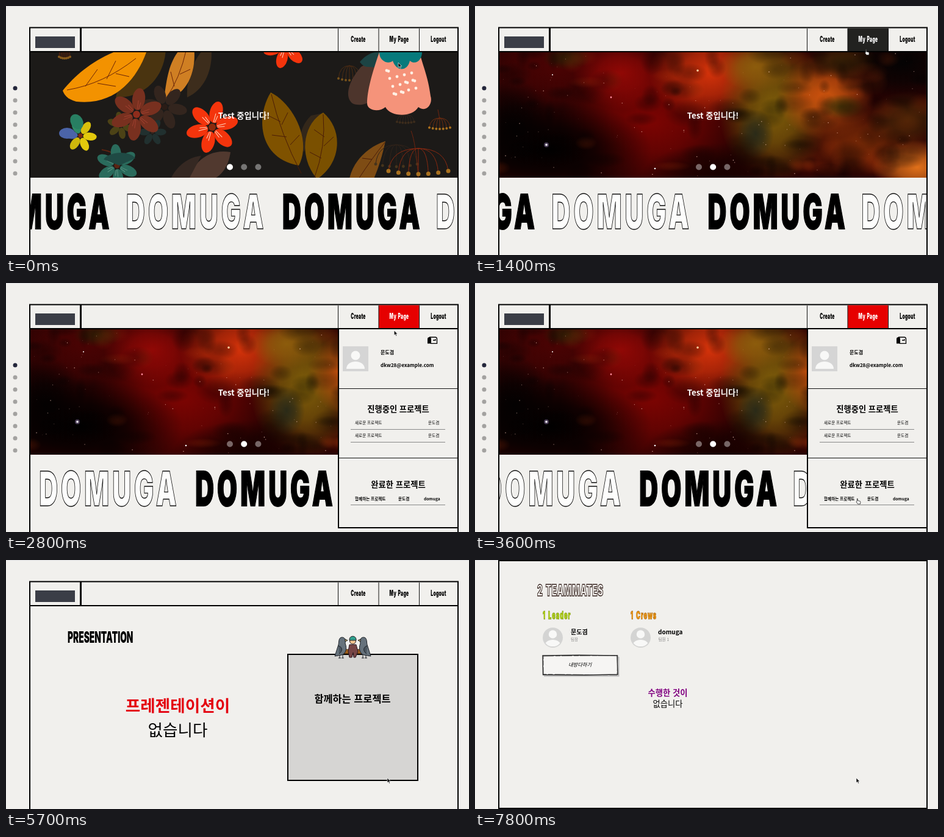
An HTML page for the animation above (8000 ms loop, 759 by 409 pixels).

```html
<!DOCTYPE html>
<html lang="ko">
<head>
<meta charset="utf-8">
<style>
html, body { margin: 0; width: 100%; height: 100%; overflow: hidden; background: #f1f0ed; }
svg { display: block; font-family: "Noto Sans CJK KR", "Noto Sans CJK", sans-serif; }
.d { font-family: Inter, sans-serif; font-weight: 900; letter-spacing: .04em; word-spacing: .15em; }
.m { text-anchor: middle; }
.b { font-weight: 700; }
.s { font-size: 6.6px; }
.h { font-size: 13.3px; font-weight: 700; text-anchor: middle; }
.line { fill: none; stroke: #000; stroke-width: 2; }
.thin { fill: none; stroke: #111; stroke-width: 1; }
.rule { fill: none; stroke: #888; stroke-width: 1; }
</style>
</head>
<body>
<svg width="759" height="409" viewBox="0 0 759 409">
  <defs>
    <clipPath id="inner"><path d="M40 76H740V409H40Z"/></clipPath>
    <clipPath id="stageClip"><path d="M40 76H740V282H40Z"/></clipPath>
    <clipPath id="drop"><rect id="dropRect" x="544" y="76" width="198" height="0"/></clipPath>
    <clipPath id="round"><circle r="16.5"/></clipPath>
    <g id="bust" fill="#f8f8f7">
      <circle cy="-6" r="7.5"/>
      <path d="M-15 16C-15 0 15 0 15 16Z"/>
    </g>
    <g id="face">
      <circle r="16.5" fill="#d4d4d3"/>
      <use href="#bust" clip-path="url(#round)" transform="scale(.9)"/>
    </g>
    <g id="bird" stroke="#1c2026" stroke-width="1">
      <path d="M547 154V161M552 154V161M545 161h4M550 161h4" fill="none"/>
      <path d="M539 158L545 139C546 134 545 127 551 127C556 127 557 132 556 137C560 146 556 155 550 156Z" fill="#66727c"/>
      <path d="M545 141C552 143 552 150 546 154" fill="#4b565f"/>
      <path d="M556 130l4 2-4 2z" fill="#e8c36a"/>
    </g>
  </defs>
  <rect width="759" height="409" fill="#f1f0ed"/>
  <path d="M0 .5H759" stroke="#e2e2e4"/>

  <g id="page">
    <g id="home">
      <g id="side"></g>
      <g clip-path="url(#stageClip)">
        <g id="slides"></g>
        <text class="h" x="390" y="185" fill="#fff">Test 중입니다!</text>
        <g id="bullets"></g>
      </g>
      <g clip-path="url(#inner)"><g id="marquee" font-size="79"></g></g>
      <g clip-path="url(#drop)">
        <path d="M545 70H741V402H545Z" fill="#f1f0ed" stroke="#000" stroke-width="2"/>
        <path class="thin" d="M545 173.5H740M545 287.5H740"/>
        <path d="M552 104h42v41h-42z" fill="#d5d5d5"/>
        <use href="#bust" x="573" y="125"/>
        <path d="M691 99.500V92a3 3 0 0 1 6 0V99.500Z"/>
        <path d="M694 89H703.500a3 3 0 0 1 3 3V99.300H696M700 94h4v-2" fill="none" stroke="#000" stroke-width="1.300"/>
        <text class="b" x="614" y="117" font-size="8">문도겸</text>
        <text class="b" x="614" y="138" font-size="8">dkw28@example.com</text>
        <text class="h" x="643" y="212">진행중인 프로젝트</text>
        <g class="s">
          <text x="572" y="232.500">새로운 프로젝트</text><text x="692" y="232.500">문도겸</text>
          <text x="572" y="253">새로운 프로젝트</text><text x="692" y="253">문도겸</text>
        </g>
        <g class="s b">
          <text x="572" y="357">함께하는 프로젝트</text><text x="643" y="357">문도겸</text><text x="685" y="357">domuga</text>
        </g>
        <text class="h" x="643" y="336">완료한 프로젝트</text>
        <path class="rule" d="M565 240.500H720M565 261.500H720M565 364.500H720"/>
      </g>
    </g>

    <g id="project">
      <text class="d" transform="translate(101 136.500) scale(.54 1)" font-size="25.500" style="letter-spacing:0">PRESENTATION</text>
      <text class="m b" x="281.500" y="249.500" font-size="26.600" fill="#e4000f">프레젠테이션이</text>
      <text class="m" x="281.500" y="289.500" font-size="26.600">없습니다</text>
      <path d="M462 155H675V362H462Z" fill="#d6d5d3" stroke="#000" stroke-width="2"/>
      <path d="M553 147H585V154H553Z" fill="#a2601c" stroke="#3a2208"/>
      <use href="#bird"/>
      <use href="#bird" transform="matrix(-1 0 0 1 1137 0)"/>
      <path d="M561 150L563 139H574L577 150L573 160H570L569 152L567 160H563Z" fill="#774545" stroke="#2a1820"/>
      <circle cx="568.500" cy="133" r="5" fill="#f3c58f" stroke="#2a1820"/>
      <path d="M563 132C562 123 575 123 574 132Z" fill="#31a08d" stroke="#2a1820"/>
      <text class="m b" x="568" y="234" font-size="16.400">함께하는 프로젝트</text>
    </g>

    <path class="line" d="M39 412V35.500H741V412M39 75H741"/>
    <path class="line" d="M122.500 36V75" style="stroke-width:3"/>
    <rect x="48" y="50" width="65" height="19" fill="#3b3e47"/>
    <rect id="cell" x="611" y="36.500" width="66.500" height="37.500"/>
    <path class="thin" d="M544.500 37V75M611 37V75M677.500 37V75"/>
    <g class="d m" font-size="12.500">
      <text transform="translate(577.500 59.500) scale(.54 1)">Create</text>
      <text id="mine" transform="translate(644.500 59.500) scale(.54 1)">My Page</text>
      <text transform="translate(709 59.500) scale(.54 1)">Logout</text>
    </g>
  </g>

  <g id="team">
    <path class="line" d="M39 1H741V408H39Z"/>
    <g class="d">
      <text transform="translate(102 59) scale(.54 1)" font-size="25.500" fill="#f8f6f3" stroke="#33211c" stroke-width="1.500">2 TEAMMATES</text>
      <g font-size="17" style="letter-spacing:.1em" stroke-width=".8">
        <text transform="translate(111 97) scale(.54 1)" fill="#b4d80c" stroke="#7c9412">1 Leader</text>
        <text transform="translate(255 97) scale(.54 1)" fill="#f59a0c" stroke="#a8640c">1 Crews</text>
      </g>
    </g>
    <use href="#face" x="127.500" y="127.500"/>
    <use href="#face" x="271.500" y="127.500"/>
    <g font-size="10" class="b"><text x="157" y="122">문도겸</text><text x="300" y="122">domuga</text></g>
    <g class="s" fill="#888"><text x="157" y="133">팀장</text><text x="300.500" y="133">팀원 1</text></g>
    <path d="M113 190.500H235.500V159" fill="none" stroke="#bbb" stroke-width="2"/>
    <path d="M111 157L170 156.300L233 157L234 188L180 189L111.500 188.500Z" fill="#f6f5f3" stroke="#222" stroke-width="1.400"/>
    <path d="M112 158L234 156.500L233 189L112 187.500Z" fill="none" stroke="#333" stroke-width=".7" stroke-dasharray="17 3 8 2"/>
    <text class="m" x="172" y="175" font-size="8.300" font-style="italic">내방다하기</text>
    <text class="m b" x="316" y="222.500" font-size="13.300" fill="#800080">수행한 것이</text>
    <text class="m" x="316" y="240.500" font-size="13.300">없습니다</text>
  </g>

  <g id="cursor" stroke="#fff" stroke-width=".6" fill="#111">
    <path id="arrow" d="M0 0V8L1.900 6.300L3.200 9.200L4.500 8.600L3.300 5.800H5.800Z"/>
    <path id="hand" d="M1.500 0C2.300 0 2.500 .6 2.500 1.500V3.500L6 4.300C7 4.600 7 5.500 6.600 9H2.500L0 5.500L1 5Z" fill="#f8f8f8" stroke="#222" stroke-width=".8"/>
  </g>
</svg>
<script>
const $ = id => document.getElementById(id);
let seed = 7;
const rnd = () => (seed = seed * 16807 % 2147483647) / 2147483647;
const range = (n, f) => Array.from({ length: n }, (_, i) => f(i)).join('');
const dot = (x, y, r, fill = '#fff', o = 1) => `<circle cx="${x}" cy="${y}" r="${r}" fill="${fill}" opacity="${o}"/>`;
const oval = (x, y, rx, ry, fill, extra = '') => `<ellipse cx="${x}" cy="${y}" rx="${rx}" ry="${ry}" fill="${fill}" ${extra}/>`;
const shape = (d, fill) => `<path d="${d}" fill="${fill}"/>`;
const curve = (d, stroke, w = 1) => `<path d="${d}" fill="none" stroke="${stroke}" stroke-width="${w}"/>`;

// ---- floral slide
function flower(x, y, r, fill, rot = 0, core = '#6e2412', streak = '') {
  const petals = range(6, i => `<g transform="rotate(${rot + i * 60})">
    ${oval(r * .6, 0, r * .43, r * .25, Array.isArray(fill) ? fill[i] : fill)}
    ${streak && curve(`M${r * .2} 0H${r * .55}M${r * .2} 2L${r * .48} 4`, streak)}</g>`);
  return `<g transform="translate(${x} ${y})">${petals}${dot(0, 0, r * .14, core)}</g>`;
}
function umbel(x, y, w, h, stem, tip) {
  return range(7, i => {
    const k = (i - 3) / 3, ex = x + k * w, ey = y + h * (1 - .12 * k * k);
    return curve(`M${x} ${y}Q${x + k * w * .9} ${y} ${ex} ${ey}`, stem) + dot(ex, ey, Math.max(2, w / 14), tip);
  });
}
function floral() {
  const red = '#f4340c', dim = '#33251e', vein = '#6a2408';
  return shape('M40 76H740V282H40Z', '#1c1a18')
    + shape('M188 118C205 90 230 70 262 62C264 112 230 152 180 150Z', '#4a3410')
    + shape('M93 139C120 105 165 70 235 60C222 110 185 165 115 157C100 153 95 145 93 139Z', '#f39200')
    + curve('M100 138Q160 128 213 86M130 132L150 104M150 127L180 132M165 120L180 90M180 111L202 116', vein)
    + shape('M297 150C295 115 310 80 335 60C342 95 330 135 297 150Z', '#3d2d1c')
    + shape('M259 154C264 115 268 75 306 55C316 100 300 148 259 154Z', '#cf7f23')
    + curve('M262 152Q285 120 296 70M276 132L270 108M285 112L302 104', vein)
    + umbel(96, 66, 9, 20, vein, '#8a5c1c')
    + flower(260, 166, 36, dim, 10, '#2a1c16') + flower(188, 196, 22, '#4c4216', 20)
    + flower(240, 207, 22, '#21302f', 0, dim)
    + flower(214, 178, 42, '#78301f', 38, '#8f2c1c', '#a04030')
    + flower(338, 199, 42, red, 45, '#8a2a0c', '#ffd8c0')
    + flower(458, 66, 36, red, 45, '#8a2a0c', '#ffd8c0')
    + flower(122, 213, 26, ['#e3c80c', '#e3c80c', '#cfb80c', '#4b64a8', '#2f8a66', '#d8c00c'], 5, '#7c2c10')
    + oval(116, 190, 10, 13, '#287f62', 'transform="rotate(-30 116 190)"') + oval(100, 209, 13, 9, '#4b64a8')
    + curve('M157 236Q180 240 187 252', '#5c2412', 2)
    + flower(182, 262, 34, '#2a6b5c', 25, '#5c2412', '#5c9484')
    + shape('M160 252C168 240 200 236 212 250L186 262Z', '#1f4a44')
    + shape('M300 284C308 254 335 234 368 240C364 268 350 280 340 284Z', '#51392f')
    + shape('M270 284C280 262 300 248 320 246L300 284Z', '#352822')
    + shape('M500 180C480 200 480 220 488 240L520 176Z', '#33271a')
    + shape('M434 142C410 180 412 250 480 262C502 220 470 160 434 142Z', '#7f5200')
    + curve('M435 145Q450 210 484 275M450 190L430 180M460 215L436 212M452 195L462 175M466 228L481 212', '#4a1c08')
    + shape('M520 175C485 195 480 250 510 284C548 260 555 205 520 175Z', '#7a5000')
    + curve('M520 178Q525 230 505 284M522 215L505 203M521 230L537 215M517 250L498 240', '#4a1c08')
    + shape('M622 222C590 232 565 260 562 290H600C612 265 618 240 622 222Z', '#7e4c14')
    + curve('M621 224Q600 250 578 284M600 252L584 250', '#4a1c08')
    + umbel(640, 228, 34, 36, '#30231a', '#46341c')
    + umbel(655, 178, 14, 14, dim, '#3c2c1c')
    + umbel(563, 98, 18, 24, '#4c2c14', '#76521c')
    + curve('M664 205Q672 225 676 284M708 170L711 186', '#6e2410')
    + umbel(676, 234, 49, 42, '#8a2810', '#a8701e') + umbel(711, 184, 17, 18, '#6e2c10', '#a8701e')
    + shape('M582 100C560 125 555 150 568 160C580 166 605 160 612 140L610 84Z', '#4d352c')
    + shape('M580 92C595 74 610 74 625 76L612 104C600 96 590 106 580 92Z', '#1c4444')
    + shape('M612 76C600 110 592 140 592 160C592 172 612 175 622 166C630 182 665 184 676 166C690 176 700 160 696 148C692 115 682 95 678 76Z', '#f5937a')
    + shape('M612 76C612 92 628 96 634 90C640 108 658 108 662 90C672 98 682 88 682 76Z', '#077a7c')
    + range(18, i => dot(624 + i * 31 % 50, 106 + i * 19 % 41, 2.4, '#fff0e4'));
}

// ---- starry slide: soft clouds [x, y, rx, ry, colour], then mottling and stars
function nebula() {
  const clouds = [
    [130, 100, 120, 70, '#4a0303'], [290, 190, 150, 110, '#7c0402'], [240, 110, 80, 60, '#900805'],
    [120, 235, 170, 80, '#000'], [60, 200, 70, 80, '#040101'], [385, 110, 100, 80, '#d4320a'],
    [490, 170, 90, 120, '#80600a'], [460, 100, 60, 40, '#8c5c0c'], [575, 150, 80, 70, '#d0560e'],
    [640, 225, 110, 55, '#7a2a06'], [725, 265, 75, 45, '#e0701a'], [700, 95, 120, 65, '#050303'],
    [710, 185, 70, 45, '#3c2006'], [400, 275, 120, 50, '#180100'], [600, 90, 60, 30, '#3c2206'],
    [460, 210, 30, 40, '#2a2a18'], [600, 165, 36, 20, '#5c4008'], [150, 85, 40, 20, '#2c1a04']];
  const glow = (id, c) => `<radialGradient id="${id}"><stop stop-color="${c}"/>
    <stop offset=".45" stop-color="${c}" stop-opacity=".7"/><stop offset="1" stop-color="${c}" stop-opacity="0"/></radialGradient>`;
  return shape('M40 76H740V282H40Z', '#2a0202') + glow('shade', '#000') + glow('spark', '#e0480c')
    + clouds.map(([x, y, rx, ry, c], i) => glow('c' + i, c) + oval(x, y, rx, ry, `url(#c${i})`)).join('')
    + range(120, i => oval(40 + rnd() * 700, 76 + rnd() * 206, 10 + rnd() * 28, 8 + rnd() * 16,
      `url(#${i % 4 ? 'shade' : 'spark'})`, `opacity="${i % 4 ? .28 : .14}"`))
    + range(110, () => dot(40 + rnd() * 700, 76 + rnd() * 206, .3 + rnd() * .5, '#ffd0c0', .3 + rnd() * .6))
    + dot(117, 228, 4, '#b090d0', .4) + dot(117, 228, 1.8) + dot(365, 106, 1.8, '#ffd0a0')
    + dot(223, 150, 1.4, '#ff90a0') + dot(295, 267, 1.3) + dot(127, 113, 1);
}

// ---- faceted slide: a jittered mesh coloured by the nearest anchors
function facets() {
  const anchors = [
    [55, 95, 0xb0382c], [60, 180, 0xec5c08], [95, 240, 0xc83c08], [100, 95, 0x94303c], [165, 120, 0x54105c],
    [150, 200, 0xa00c38], [130, 270, 0xa01c50], [250, 105, 0x3c04a0], [230, 180, 0x5a10d0], [300, 190, 0x900cb0],
    [330, 235, 0xe000c4], [420, 265, 0xe400bc], [240, 265, 0xd000c8], [325, 95, 0x4c0c98], [370, 110, 0xc8846c],
    [430, 110, 0xeca470], [495, 90, 0x48a0ac], [530, 130, 0x3498b8], [375, 180, 0xcc1090], [430, 180, 0xdc5c88],
    [485, 185, 0xc02080], [520, 220, 0x500898], [500, 265, 0xa80c80]];
  const color = (x, y) => {
    const sum = [0, 0, 0];
    let total = 0;
    for (const [ax, ay, c] of anchors) {
      const w = 1 / (((x - ax) ** 2 + (y - ay) ** 2) ** 2 + 1e4);
      total += w;
      [16, 8, 0].forEach((s, i) => sum[i] += w * (c >> s & 255));
    }
    const light = .86 + rnd() * .28;
    return `rgb(${sum.map(v => Math.min(255, Math.round(v / total * light)))})`;
  };
  const mesh = Array.from({ length: 6 }, (_, r) => Array.from({ length: 16 }, (_, c) =>
    [15 + c * 50 + r % 2 * 22 + (rnd() - .5) * 34, 58 + r * 48 + (rnd() - .5) * 30]));
  const tri = (...p) => {
    const mid = k => (p[0][k] + p[1][k] + p[2][k]) / 3, c = color(mid(0), mid(1));
    return `<path d="M${p.join('L')}Z" fill="${c}" stroke="${c}" stroke-width=".5"/>`;
  };
  return range(5, r => range(15, c => {
    const a = mesh[r][c], b = mesh[r][c + 1], d = mesh[r + 1][c], e = mesh[r + 1][c + 1];
    return r % 2 ? tri(a, b, e) + tri(a, e, d) : tri(a, b, d) + tri(b, e, d);
  }));
}

// ---- static pieces
$('slides').innerHTML = [floral, nebula, facets].map((draw, i) =>
  `<svg x="${40 + i * 700}" y="76" width="700" height="206" viewBox="40 76 700 206">${draw()}</svg>`).join('');
$('side').innerHTML = range(8, i => dot(15, 135 + i * 20, 3.5, i ? '#a3a2a0' : '#23263a'));
$('bullets').innerHTML = range(3, i => dot(367 + i * 23.2, 264.5, 5));
$('marquee').innerHTML = [-56, 197, 453, 705, 961].map((x, i) =>
  `<text class="d" transform="translate(${x} 366.5) scale(.54 1)" style="letter-spacing:.12em"
    ${i % 2 ? 'fill="#fdfdfc" stroke="#111" stroke-width="1.4"' : 'stroke="#000" stroke-width="2"'}>DOMUGA</text>`).join('');

// ---- motion
const OPEN = 2300, LOAD = 4500, SPEED = .051, SLIDE = [808, 3808];
const part = (t, from, to) => Math.min(1, Math.max(0, (t - from) / (to - from)));
function ease(x) { // cubic-bezier(.25, .1, .25, 1)
  let lo = 0, hi = 1;
  const at = (u, a, b) => 3 * (1 - u) ** 2 * u * a + 3 * (1 - u) * u * u * b + u ** 3;
  for (let i = 0; i < 20; i++) {
    const u = (lo + hi) / 2;
    at(u, .25, .25) < x ? lo = u : hi = u;
  }
  return at(hi, .1, 1);
}
const move = (el, x, y) => $(el).setAttribute('transform', `translate(${x} ${y})`);
const show = (el, on) => $(el).style.display = on ? '' : 'none';

function frame(now) {
  const t = now % 8000, home = t < LOAD;
  show('home', home);
  show('project', !home);
  $('project').style.opacity = part(t, LOAD, 4900);

  const active = SLIDE.filter(s => t >= s).length;
  move('slides', -700 * SLIDE.reduce((sum, s) => sum + ease(part(t, s, s + 500)), 0), 0);
  [...$('bullets').children].forEach((b, i) => b.setAttribute('opacity', i === active ? 1 : .4));
  move('marquee', -SPEED * t, 0);
  $('dropRect').setAttribute('height', 327 * ease(part(t, OPEN, OPEN + 300)));

  const up = ease(part(t, 1200, 1750)), down = ease(part(t, 2750, 3400));
  const x = 643 - 6 * up - 12 * down, y = 93 - 34 * up + 295 * down;
  const hover = y < 74, hand = home && (hover || t > 3300);
  move('cursor', x, home ? y : 358);
  show('hand', hand);
  show('arrow', !hand);

  const open = home && t >= OPEN;
  $('cell').setAttribute('fill', hover ? '#222220' : open ? '#e60000' : 'none');
  $('mine').setAttribute('fill', hover || open ? '#fff' : '#000');

  const scroll = 409 * ease(part(t, 6700, 7400));
  move('page', 0, -scroll);
  move('team', 0, 409 - scroll);
  requestAnimationFrame(frame);
}
frame(0);
</script>
</body>
</html>
```
